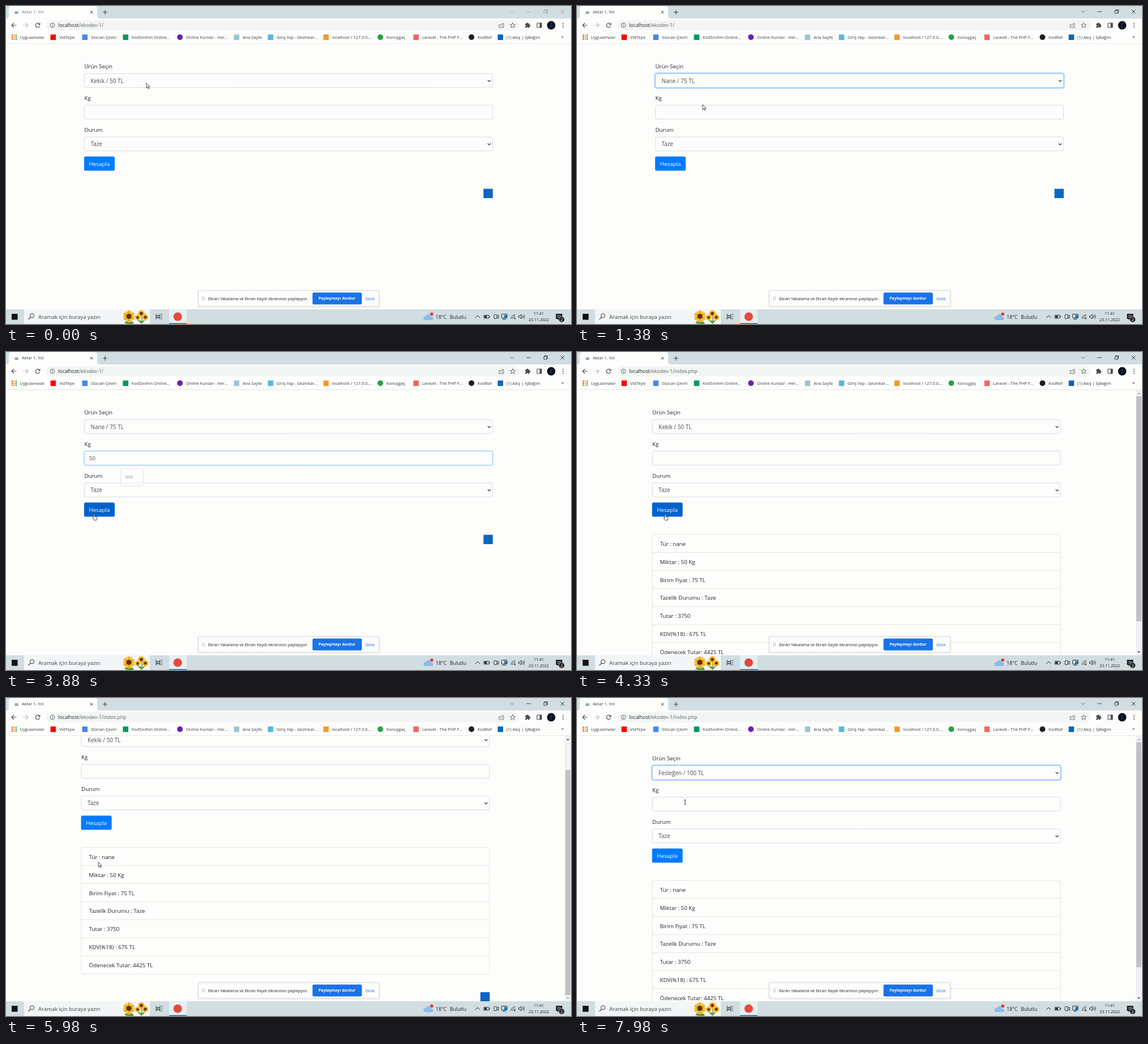
These frames come from a looping animation (998x561 px, 8000 ms). An HTML page with a canvas:

```html
<!DOCTYPE html>
<html lang="tr">
<head>
<meta charset="utf-8">
<title>Aktar</title>
<style>
  html, body { margin: 0; width: 100%; height: 100%; overflow: hidden; background: #fdfdfb; }
  canvas { display: block; width: 998px; height: 561px; }
</style>
</head>
<body>
<canvas id="stage" width="998" height="561"></canvas>
<script>
const c = document.getElementById('stage').getContext('2d');
const LOOP = 8000, LOAD = 4150, PAGE = '#fdfdfb', INK = '#212529', DARK = '#3c4043';
const FIELD_W = 721, FIELD_H = 24.6;
const RESULTS = ['Tür : nane', 'Miktar : 50 Kg', 'Birim Fiyat : 75 TL', 'Tazelik Durumu : Taze',
  'Tutar : 3750', 'KDV(%18) : 675 TL', 'Ödenecek Tutar: 4425 TL'];
const BOOKMARKS = [
  [94, 'VidTepe', '#f00', 'box'], [150, 'Sözcan Çeviri', '#4a87e8', 'box'],
  [222, 'KodSınıfım Online...', '#059862', 'box'], [318, 'Online Kurslar - Her...', '#6a1fb5', 'dot'],
  [418, 'Ana Sayfa', '#9cc5cf', 'box'], [478, 'Giriş Yap - Gezinkar...', '#58b7dc', 'box'],
  [576, 'localhost / 127.0.0....', '#f29a2e', 'box'], [672, 'Konuşgaç', '#25a244', 'dot'],
  [735, 'Laravel - The PHP F...', '#f4645f', 'box'], [833, 'KodRaf', '#1b1f23', 'dot'],
  [884, '(1) Akış | İşBağım', '#0a66c2', 'box']
];
// Pointer path: time, x, y
const PATH = [[0, 248, 136], [500, 248, 136], [1150, 228, 162], [1380, 222, 174], [1900, 214, 188],
  [2510, 214, 197], [3250, 214, 197], [3800, 156, 286.5], [4300, 156, 286.5], [4650, 162, 294],
  [5900, 162, 294], [6700, 203, 136], [7050, 203, 136], [7600, 196, 172], [7980, 191, 184], [8000, 191, 184]];

const clamp = v => Math.max(0, Math.min(1, v));
const ramp = (t, a, b) => { const k = clamp((t - a) / (b - a)); return k * k * (3 - 2 * k); };
const pulse = (t, a, b) => ramp(t, a, a + 150) - ramp(t, b, b + 150);

function pointerAt(t) {
  const i = Math.max(1, PATH.findIndex(p => p[0] > t));
  const [t0, x0, y0] = PATH[i - 1], [t1, x1, y1] = PATH[i];
  const k = ramp(t, t0, t1);
  return { x: x0 + (x1 - x0) * k, y: y0 + (y1 - y0) * k };
}

function text(s, x, y, size, color = INK, align = 'left', weight = 400) {
  c.font = `${weight} ${size}px "Open Sans", "Noto Sans", sans-serif`;
  c.textAlign = align;
  c.fillStyle = color;
  c.fillText(s, x, y);
}
function rect(x, y, w, h, color) { c.fillStyle = color; c.fillRect(x, y, w, h); }
function box(x, y, w, h, r, fill, stroke, lw = 0.7) {
  c.beginPath();
  c.roundRect(x, y, w, h, r);
  if (fill) { c.fillStyle = fill; c.fill(); }
  if (stroke) { c.strokeStyle = stroke; c.lineWidth = lw; c.stroke(); }
}
function disc(x, y, r, color) { c.beginPath(); c.arc(x, y, r, 0, 7); c.fillStyle = color; c.fill(); }
function arc(x, y, r, a, b, color, lw = 1) {
  c.beginPath(); c.arc(x, y, r, a, b); c.strokeStyle = color; c.lineWidth = lw; c.stroke();
}
// Strokes or fills an SVG path at an offset
function path(d, x, y, color, lw = 1, fill) {
  const p = new Path2D(d);
  c.save();
  c.translate(x, y);
  if (fill) { c.fillStyle = fill; c.fill(p); }
  if (color) { c.strokeStyle = color; c.lineWidth = lw; c.lineJoin = 'round'; c.stroke(p); }
  c.restore();
}
// White panel whose soft shadow stays outside its edge, so that it can fade
function panel(x, y, w, h, r) {
  box(x - 1, y - 0.2, w + 2, h + 2, r + 1, null, 'rgba(0,0,0,.08)', 1.6);
  box(x, y, w, h, r, PAGE, '#d0d3d5', 0.7);
}

function drawTabs(active) {
  rect(0, 0, 998, 22, '#d1dde1');
  path('M0 22Q5 22 5 17V5Q5 0 10 0H156Q161 0 161 5V17Q161 22 166 22Z', 0, 0, null, 0, PAGE);
  box(15, 9, 7, 4.5, 1.5, '#9dc0cb');
  rect(16, 12, 5, 1.5, '#6d8791');
  text('Aktar 1. Yol', 28, 13.4, 7.4, active ? DARK : '#72777b');
  path('M-2.3-2.3L2.3 2.3M2.3-2.3L-2.3 2.3', 151, 11, DARK, 1);
  path('M-4 0H4M0-4V4', 175, 11, DARK, 1.1);
  const ctl = active ? '#1f2325' : '#929a9d';
  path('M-3.5-1.7L0 1.8L3.5-1.7', 894, 10, active ? '#555d60' : '#a3abae', 0.9);
  path('M-4 0H4', 923, 10, ctl, 0.8);
  path('M-3-1.5H2V3.5H-3ZM-1.5-1.5V-3H3.5V2H2', 953, 9.5, ctl, 0.8);
  path('M-3.3-3.3L3.3 3.3M3.3-3.3L-3.3 3.3', 983, 10, ctl, 0.9);
}

function drawToolbar(url) {
  rect(0, 22, 998, 45, PAGE);
  path('M4.5 0H-4M0-4L-4 0L0 4', 14, 34, '#4a4d51', 1.2);
  path('M-4.5 0H4M0-4L4 0L0 4', 35, 34, '#b9bcbf', 1.1);
  arc(56, 34, 3.8, 0.4, 5.4, '#4a4d51', 1.2);
  path('M4.4-4.6V-.6H.4Z', 56, 34, null, 0, '#4a4d51');
  box(71, 25, 836, 18, 9, '#f3f5f5');
  arc(82, 34, 3.9, 0, 7, '#55595d', 0.9);
  rect(81.5, 33.4, 1, 2.8, '#55595d');
  rect(81.5, 31.6, 1, 1.1, '#55595d');
  text('localhost', 92, 37, 8.75, '#202124');
  const w = c.measureText('localhost').width;
  text(url, 92 + w, 37, 8.75, '#5f6368');
  path('M-2-1.5H-4V4H4V1.5M-1.5 1.5Q-1-2 2-2V-4L5-1.2L2 1.5V0', 875, 34, '#5f6368', 0.9);
  path('M0-4.6L1.3-1.5L4.6-1.3L2.1.9L2.9 4.2L0 2.4L-2.9 4.2L-2.1.9L-4.6-1.3L-1.3-1.5Z', 895, 34, '#5f6368', 0.9);
  box(917, 31, 7.6, 7.4, 1, '#4a4d51');
  disc(921, 31, 1.7, '#4a4d51');
  disc(924.6, 34.6, 1.7, '#4a4d51');
  disc(917.3, 34.8, 1.2, PAGE);
  disc(921, 38.2, 1.2, PAGE);
  box(938, 30, 8, 8, 0.7, null, '#4a4d51', 1.2);
  rect(942.5, 30, 3.5, 8, '#4a4d51');
  disc(963, 34, 7.4, '#0a101e');
  path('M1-4Q-2 0 0 4', 963, 34, '#1d4f86', 1.2);
  for (const y of [30.5, 34, 37.5]) disc(984, y, 0.95, '#4a4d51');

  for (let i = 0; i < 9; i++)
    rect(10 + i % 3 * 3.4, 50.5 + (i / 3 | 0) * 3.4, 2.3, 2.3, ['#e8453c', '#f5b21c', '#37a852'][i % 3]);
  text('Uygulamalar', 24.5, 57.7, 7.4, DARK);
  for (const [x, label, color, shape] of BOOKMARKS) {
    if (shape === 'dot') disc(x - 10.8, 55, 5, color);
    else box(x - 15.5, 50.3, 9.6, 9.6, 1, color);
    text(label, x, 57.7, 7.4, DARK);
  }
  text('»', 983, 57.4, 8.5, DARK, 'center');
  rect(0, 66, 998, 0.8, '#dfe2e4');
}

function field(x, y, value, focus, select) {
  if (focus > 0) box(x - 1, y - 1, FIELD_W + 2, FIELD_H + 2, 3.4, null, `rgba(0,123,255,${0.3 * focus})`, 2.2);
  box(x, y, FIELD_W, FIELD_H, 2.6, PAGE, focus > 0.3 ? '#80bdff' : '#ced4da', 0.8);
  text(value, x + (select ? 11 : 8.6), y + 16.3, select ? 10 : 9.8, '#495057');
  if (select) path('M-2.5-1.3L0 1.3L2.5-1.3', x + 715, y + 12.8, '#2b2f33', 1.2);
}

function suggestions(t) {
  const alpha = 1 - clamp((t - 3820) / 120);
  if (t < 2300 || alpha <= 0) return;
  const items = t < 2850 ? ['2', '1', '500', '4', 'a'] : ['500'];
  c.globalAlpha = alpha;
  panel(203, 206, 39, 5.5 + 23.4 * items.length, 2);
  items.forEach((s, i) => text(s, 210.5, 222.7 + 23.4 * i, 7.8, '#202124'));
  c.globalAlpha = 1;
}

function drawPage(t, p, scroll) {
  const loaded = t >= LOAD, x = loaded ? 133 : 138.4;
  const inside = (px, py, w, h) => p.x >= px && p.x <= px + w && p.y + scroll >= py && p.y + scroll <= py + h;
  const onButton = inside(x, 266, 53.5, FIELD_H), onInput = inside(x, 175, FIELD_W, FIELD_H);
  const product = t < 1200 ? 'Kekik / 50 TL' : !loaded ? 'Nane / 75 TL'
    : t < 7500 ? 'Kekik / 50 TL' : 'Fesleğen / 100 TL';
  const amount = t < 2850 || loaded ? '' : t < 3050 ? '5' : '50';

  c.save();
  c.beginPath();
  c.rect(0, 67, 998, 468);
  c.clip();
  rect(0, 67, 998, 468, PAGE);
  c.translate(0, -scroll);
  text('Ürün Seçin', x, 110, 9.8);
  field(x, 119.3, product, pulse(t, 500, 1950) + ramp(t, 7050, 7200), true);
  text('Kg', x, 166, 9.8);
  field(x, 175, amount, pulse(t, 1950, 3790), false);
  text('Durum', x, 221.8, 9.8);
  field(x, 231, 'Taze', 0, true);
  box(x - 0.4, 265.6, 54, 25, 2.6, onButton ? '#0062cc' : '#007bff');
  text('Hesapla', x + 26.6, 282, 9.8, '#fff', 'center');

  if (loaded) {
    box(x, 321.7, FIELD_W, 223.3, 2.6, PAGE, '#dfdfdf', 0.8);
    RESULTS.forEach((s, i) => {
      const y = 321.7 + i * 31.85;
      if (i) rect(x, y - 0.4, FIELD_W, 0.8, '#dfdfdf');
      text(s, 146.5, y + 20.2, 9.8);
    });
  }
  rect(x + 705, loaded ? 577 : 322.5, 16.4, 16.4, '#0a66c2');
  c.restore();
  suggestions(t);
  if (loaded) drawScrollbar(scroll);
  return onButton ? 'hand' : onInput ? 'beam' : 'arrow';
}

function drawScrollbar(scroll) {
  rect(987, 67, 11, 468, '#f1f1f1');
  rect(988, 78 + 49 * scroll / 58, 9, 397, '#c1c1c1');
  path('M-2.6 1.4L0-1.4L2.6 1.4Z', 992.5, 73, null, 0, scroll > 0 ? '#505050' : '#a3a3a3');
  path('M-2.6-1.4L0 1.4L2.6-1.4Z', 992.5, 529.5, null, 0, scroll < 58 ? '#505050' : '#a3a3a3');
}

function drawShareBar() {
  panel(340, 502, 319, 27.5, 1);
  rect(347, 512.5, 1, 7, '#b9bcbf');
  rect(349.6, 512.5, 1, 7, '#b9bcbf');
  text('Ekran Yakalama ve Ekran Kaydı ekranınızı paylaşıyor.', 357, 518.5, 7.27, '#202124');
  box(541.4, 505.5, 87.2, 21, 2.5, '#1a73e8');
  text('Paylaşmayı durdur', 584.6, 518.4, 6.95, '#fff', 'center', 700);
  text('Gizle', 634.8, 518.5, 7.3, '#1a73e8');
}

function sunflower(x, y, r) {
  for (let i = 0; i < 12; i++) {
    const a = i * Math.PI / 6;
    c.beginPath();
    c.ellipse(x + Math.cos(a) * r * 0.65, y + Math.sin(a) * r * 0.65, r * 0.42, r * 0.2, a, 0, 7);
    c.fillStyle = i % 2 ? '#f2a516' : '#f8c42c';
    c.fill();
  }
  disc(x, y, r * 0.46, '#5b3217');
}

function drawTaskbar() {
  rect(0, 535, 998, 26, '#d1dde1');
  rect(10, 543, 10.5, 10.5, '#111');
  rect(32, 535, 222, 26, '#f3f6f6');
  arc(46, 546.3, 3.6, 0, 7, '#303436', 1);
  path('M-2.7 2.7L-6.5 6.5', 46, 546.3, '#303436', 1.1);
  text('Aramak için buraya yazın', 57, 551.5, 9.46, '#3b3f41');
  path('M0 0Q2 8 0 14M-7 6Q-3 10 0 14M7 5Q4 11 0 14', 239, 546, '#4c8a2c', 1.2);
  path('M-5 10Q0 5 1 11ZM5 10Q0 5 0 12Z', 239, 547, null, 0, '#5c9c38');
  path('M-8 8Q-4 2 0 8Q5 2 9 9Q2 12-8 8', 217, 551, null, 0, '#5c9c38');
  sunflower(217, 547.5, 10);
  sunflower(239, 542.5, 6);
  sunflower(232.5, 549.5, 5);
  sunflower(246, 549, 5.5);
  path('M-5-5V-2H2V-5M-5 5V2H2V5M-5-1H2V1.5H-5ZM5-5V-2M5-.8V1.2M5 2.5V5', 270, 548, '#2b2f31', 0.9);
  rect(288, 535, 31, 26, '#e6eef0');
  rect(288, 559.5, 31, 1.5, '#0f74cc');
  disc(303.3, 548, 7.6, '#e24a3b');

  disc(752, 543.5, 2.8, '#d83b2f');
  path('M-5 4.5Q-9 4-8 .5Q-7-2-4-1.5Q-2-6 2-4.5Q4-3.5 4-.5Q8-.5 8 2Q8 4.5 5 4.5Z', 746, 549, '#5d94d6', 0.5, '#8cbcf0');
  text('18°C', 759, 551.5, 8.7, '#1e2224');
  text('Bulutlu', 784, 551.5, 8.7, '#1e2224');
  path('M-4 2L0-2L4 2', 833, 548, '#222', 1);
  box(844, 545.5, 9, 5.4, 0.5, null, '#222', 0.9);
  rect(845, 546.5, 4.5, 3.4, '#222');
  rect(853.5, 547, 1.2, 2.4, '#222');
  box(862, 544.5, 5, 7, 1, null, '#222', 0.9);
  path('M5 2L8 .5V6L5 4.5', 862, 545, '#222', 0.9);
  box(875.5, 543.5, 9.5, 7, 0.5, null, '#222', 0.9);
  rect(877, 552, 6, 1, '#222');
  rect(880, 545, 5.5, 5.5, '#1577c2');
  for (const r of [2.5, 5, 7.5]) arc(899.5, 552, r, Math.PI, Math.PI * 1.5, '#333', 0.9);
  disc(899, 551.5, 1, '#222');
  path('M0-1.5H2L4.5-4V4L2 1.5H0Z', 905.5, 548, '#222', 0.9);
  for (const r of [2, 4, 6]) arc(910, 548, r, -0.8, 0.8, '#333', 0.8);
  text('11:41', 941, 544.8, 7.05, '#1e2224', 'center');
  text('23.11.2022', 941, 556.4, 7.05, '#1e2224', 'center');
  path('M0 0H11V9H5L3 11.5V9H0Z', 971.5, 543, null, 0, '#111');
  for (const y of [545, 547, 549]) rect(973.5, y, 7, 0.7, '#d1dde1');
  disc(981.5, 553, 5, '#1d2022');
  arc(981.5, 553, 5, 0, 7, '#d1dde1', 0.6);
  text('2', 981.5, 555.6, 7, '#fff', 'center');
}

function drawPointer(kind, { x, y }) {
  if (kind === 'arrow') path('M0 0V8.6L2 6.8L3.4 10L4.8 9.4L3.4 6.3H6Z', x, y, '#222', 0.8, '#fff');
  else if (kind === 'beam') path('M-1.8-4H-.4L0-3.6L.4-4H1.8M0-3.6V3.6M-1.8 4H-.4L0 3.6L.4 4H1.8', x, y, '#222', 0.9);
  else path('M-1 0Q0-1.2 1 0V3.8L4 4.4Q5 4.8 4.8 6L4 10H-.6L-3.2 6.4Q-2.6 5-1 6.4Z', x, y, '#222', 0.8, '#fff');
}

function draw(t) {
  const p = pointerAt(t);
  const scroll = 58 * (ramp(t, 4450, 4620) - ramp(t, 6000, 6170));
  c.clearRect(0, 0, 998, 561);
  const kind = drawPage(t, p, scroll);
  drawTabs(t >= 500);
  drawToolbar(t < LOAD ? '/ekodev-1/' : '/ekodev-1/index.php');
  drawShareBar();
  drawTaskbar();
  drawPointer(kind, p);
}

function tick() {
  draw(performance.now() % LOOP);
  requestAnimationFrame(tick);
}
tick();
</script>
</body>
</html>
```
